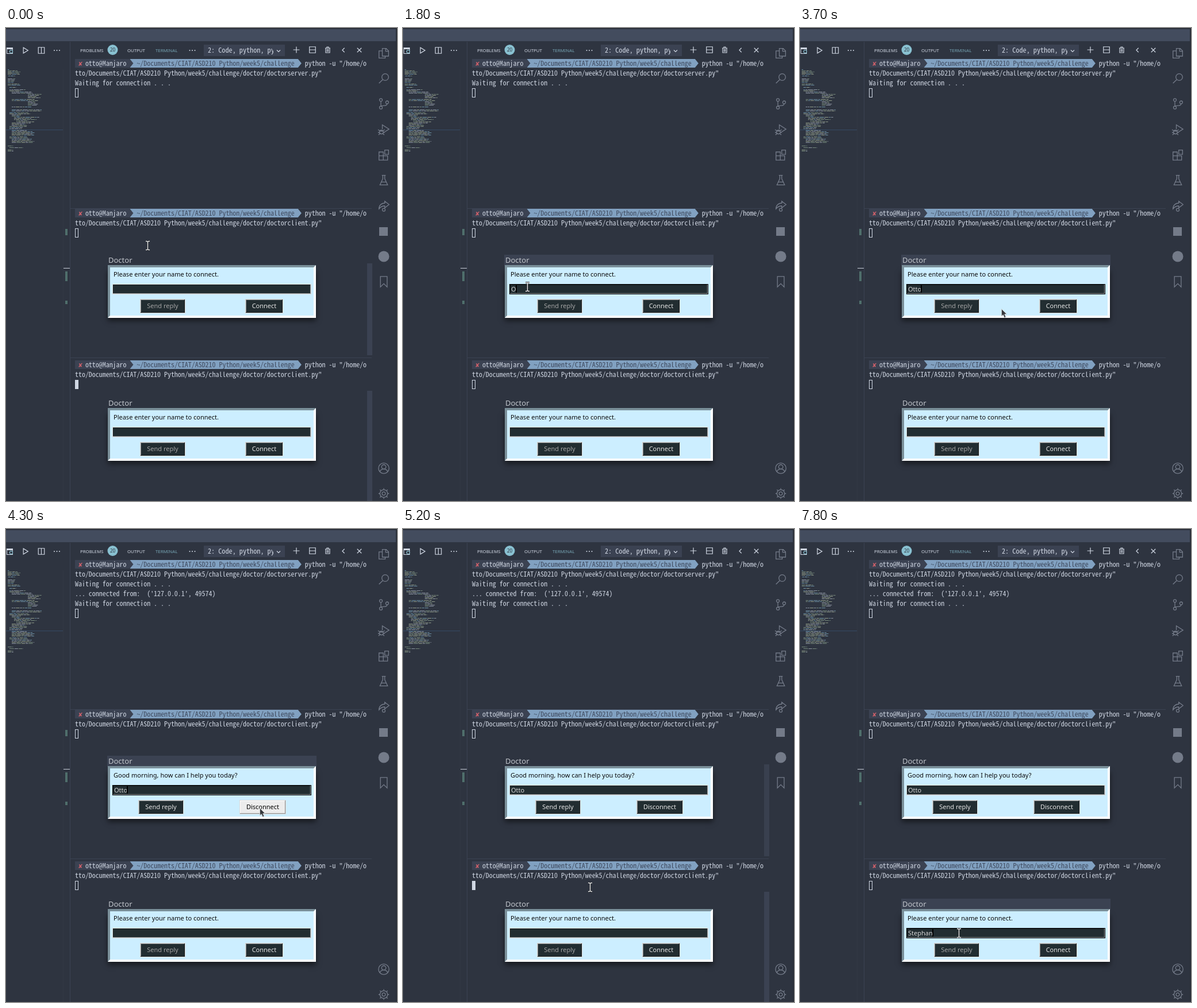
These frames come from a looping animation (680x824 px, 8000 ms). An HTML page with a canvas:

```html
<!DOCTYPE html>
<html lang="en">
<head>
<meta charset="utf-8">
<title>Doctor chat</title>
<style>
html, body { margin: 0; width: 100%; height: 100%; overflow: hidden; background: #2e3440; }
canvas { display: block; }
</style>
</head>
<body>
<canvas id="stage" width="680" height="824"></canvas>
<script>
const ctx = document.getElementById('stage').getContext('2d');
const LOOP = 8000;
const SANS = '"Noto Sans", sans-serif';
const MONO = '"Noto Sans Mono CJK JP", "Noto Sans Mono", monospace';
const BG = '#2e3440', PANEL = '#3b4252', TEXT = '#d0d7e3', BLUE = '#81a1c1', DIM = '#747b89';
const FIELD = '#222d31', LIGHT = '#909698', DARK = '#141b1d';
const CELL = 5.967, LEFT = 120;

// Monospace font whose characters advance by the given width.
function monoAt(advance) {
  ctx.font = '100px ' + MONO;
  return (advance * 100 / ctx.measureText('m').width).toFixed(2) + 'px ' + MONO;
}
const monoFont = monoAt(CELL), menuFont = monoAt(6.1);

function rect(x, y, w, h, color) {
  ctx.fillStyle = color;
  ctx.fillRect(x, y, w, h);
}

function box(x, y, w, h, color) {
  ctx.strokeStyle = color;
  ctx.lineWidth = 1;
  ctx.strokeRect(x + 0.5, y + 0.5, w - 1, h - 1);
}

function text(str, x, y, font, color, align = 'left') {
  ctx.font = font;
  ctx.fillStyle = color;
  ctx.textAlign = align;
  ctx.fillText(str, x, y);
}

const sans = (str, x, y, size, color, align) => text(str, x, y, size + 'px ' + SANS, color, align);
const mono = (str, col, y, color = TEXT) => text(str, LEFT + col * CELL, y, monoFont, color);

function poly(points, color) {
  ctx.fillStyle = color;
  ctx.beginPath();
  points.forEach(([x, y]) => ctx.lineTo(x, y));
  ctx.closePath();
  ctx.fill();
}

function disc(x, y, r, color) {
  ctx.fillStyle = color;
  ctx.beginPath();
  ctx.arc(x, y, r, 0, 7);
  ctx.fill();
}

// Line icon drawn on a 24-unit grid around (x, y).
function icon(path, x, y, size, color, weight = 1.2) {
  ctx.save();
  ctx.translate(x - size / 2, y - size / 2);
  ctx.scale(size / 24, size / 24);
  ctx.strokeStyle = color;
  ctx.lineWidth = weight * 24 / size;
  ctx.stroke(new Path2D(path));
  ctx.restore();
}

const ring = (x, y, r) => `M${x - r} ${y}a${r} ${r} 0 1 1 ${2 * r} 0a${r} ${r} 0 1 1 ${-2 * r} 0`;

const tools = [
  ['M5 3l15 9-15 9z', 34, 39, 13],
  ['M3 3H21V21H3zM12 3V21', 61.5, 39, 14],
  ['M12 2V22M2 12H22', 505, 38, 13],
  ['M3 3H21V21H3zM3 12H21', 533, 38, 14],
  ['M3 6H21M9 6V2h6V6M5 6V22H19V6M10 9V19M14 9V19', 559.5, 38, 12],
  ['M16 3L7 12l9 9', 587, 38.5, 10],
  ['M3 3L21 21M21 3L3 21', 614.5, 38.5, 10],
  ['M4 8l8 8 8-8', 474, 40, 9]
];

const activity = [
  ['M9 2h8l5 5v11H9zM16 2v6h6M9 7H2v15h13v-4', 44],
  [ring(15, 9, 7) + 'M10 14L2 22', 88],
  [ring(6, 4, 3) + ring(6, 20, 3) + ring(19, 9, 3) + 'M6 7V17M19 12c0 4-4 4-8 4-3 0-5 0-5 2', 132],
  ['M9 11V2l14 9-11 7' + ring(7, 17, 4) + 'M3 15H11M0 12l3 2M0 18h3M1 23l3-3M14 12l-3 2M14 18h-3M13 23l-3-3', 177],
  ['M2 6H11V23H2zM2 14H20V23H11V14M14 2h8v9h-8z', 221],
  ['M8 2H16M10 2V9L4 22H20L14 9V2M7 16H17', 265],
  ['M14 2l9 7-9 7v-4C8 12 5 14 2 18 2 11 7 6 14 6z' + ring(12, 20, 3), 310],
  ['M5 1H19V23l-7-7-7 7z', 442],
  [ring(12, 12, 11) + ring(12, 9, 4.5) + 'M4 19c2-7 14-7 16 0', 767],
  [ring(12, 12, 3.5) + ring(12, 12, 8) + 'M12 1v3M12 20v3M1 12h3M20 12h3M4 4l2.5 2.5M17.5 17.5L20 20M20 4l-2.5 2.5M6.5 17.5L4 20', 811]
];

// Minimap blocks: first row y, rows, left edge, longest right edge
const blocks = [
  [72, 1, 3, 7], [74, 4, 3, 28], [83, 1, 4, 20], [88, 4, 3, 18], [97, 2, 3, 30],
  [103, 1, 6, 20], [107, 2, 6, 36], [111, 2, 10, 58], [115, 4, 38, 62], [124, 2, 10, 58],
  [128, 4, 38, 56], [137, 1, 10, 62], [142, 2, 10, 70], [147, 2, 6, 44], [151, 2, 10, 26],
  [155, 3, 14, 60], [161, 2, 18, 50], [165, 3, 10, 46], [171, 3, 6, 40], [178, 5, 10, 52],
  [189, 2, 6, 44], [193, 4, 10, 56], [205, 1, 3, 14], [208, 1, 6, 30], [212, 2, 3, 13]
];

function minimap() {
  let seed = 7;
  const rnd = () => (seed = seed * 16807 % 2147483647) / 2147483647;
  const inks = ['#8b93a0', '#6c8fa3', '#74877a', '#8f9a88'];
  rect(0, 177, 99, 1, '#354a64');
  for (const [top, rows, x0, x1] of blocks) {
    for (let i = 0; i < rows; i++) {
      const end = x0 + (x1 - x0) * (0.6 + 0.4 * rnd());
      for (let x = x0; x < end;) {
        const w = Math.min(2 + rnd() * 7, end - x);
        rect(x, top + i * 2, w, 1, inks[Math.floor(rnd() * 4)]);
        x += w + 1;
      }
    }
  }
}

function chrome() {
  rect(0, 0, 680, 824, BG);
  rect(0, 0, 680, 2, '#292e39');
  rect(0, 2, 678, 21, '#434c5e');
  rect(678, 0, 2, 824, '#272c36');
  minimap();
  rect(99, 72, 1, 752, '#323845');
  rect(111, 24, 1, 800, PANEL);
  rect(112, 314, 524, 1, PANEL);
  rect(112, 574, 524, 1, PANEL);
  rect(103, 350, 4, 11, '#4f6e6b');
  rect(103, 424, 4, 17, '#4f6e6b');
  rect(103, 475, 4, 6, '#4f6e6b');
  rect(100, 418, 11, 1, '#c8ced9');

  sans('PROBLEMS', 129, 41.5, 7.8, TEXT);
  sans('OUTPUT', 211, 41.5, 7.8, TEXT);
  sans('TERMINAL', 260, 41.5, 7.8, '#77a6b5');
  disc(185.5, 38, 9, '#88c0d0');
  sans('20', 185.5, 41, 8, BG, 'center');
  for (const x of [84, 88.5, 93, 319.5, 324, 328.5]) disc(x, 39, 1, TEXT);
  rect(344, 29, 141, 20, PANEL);
  ctx.save();
  ctx.beginPath();
  ctx.rect(344, 29, 121, 20);
  ctx.clip();
  text('2: Code, python, py', 351, 43, menuFont, TEXT);
  ctx.restore();
  for (const [path, x, y, size] of tools) icon(path, x, y, size, TEXT);
  box(1, 34, 11, 11, TEXT);
  rect(1, 34, 11, 3, TEXT);
  disc(9, 41, 3, BG);
  icon(ring(12, 12, 9), 9, 41, 7, '#88c0d0');

  for (const [path, y] of activity) icon(path, 657, y, 20, DIM, 1.3);
  rect(649, 347, 15, 15, DIM);
  disc(657, 398, 9.5, DIM);
}

function prompt(top, script) {
  const arrow1 = LEFT + 16 * CELL, arrow2 = LEFT + 65 * CELL;
  const mid = top + 7.5, low = top + 15, base = top + 11.5;
  poly([[arrow1, top], [arrow2, top], [arrow2 + 6, mid], [arrow2, low], [arrow1, low]], BLUE);
  poly([[LEFT, top], [arrow1, top], [arrow1 + 6, mid], [arrow1, low], [LEFT, low]], PANEL);
  text('✘', LEFT + 1.5 * CELL + 0.5, base, '10px "DejaVu Sans", sans-serif', '#d0606a', 'center');
  mono('otto@Manjaro', 3, base);
  mono('~/Documents/CIAT/ASD210 Python/week5/challenge', 18, base, '#3f4a5e');
  mono('python -u "/home/o', 67, base);
  mono(`tto/Documents/CIAT/ASD210 Python/week5/challenge/doctor/${script}.py"`, 0, base + 17);
}

function block(y, solid) {
  if (solid) rect(120, y, 6, 16, TEXT);
  else box(120, y, 6, 16, TEXT);
}

// Outer ring with a one-pixel bevel inside.
function field(x, y, w, h, edge, fill, topLeft, lowRight) {
  rect(x, y, w, h, edge);
  rect(x + 1, y + 1, w - 2, h - 2, lowRight);
  rect(x + 1, y + 1, w - 3, h - 3, topLeft);
  rect(x + 2, y + 2, w - 4, h - 4, fill);
}

function button(x, y, w, label, { off, hover } = {}) {
  if (hover) field(x, y, w, 25, '#d9d9d9', '#ececec', '#fff', '#8e8e8e');
  else field(x, y, w, 25, '#d9d9d9', FIELD, LIGHT, DARK);
  sans(label, x + w / 2, y + 16, 11, hover ? '#000' : off ? '#a3a3a3' : '#e4e4e4', 'center');
}

function dialog(top, s) {
  if (s.active) rect(176, top - 19, 364, 19, PANEL);
  sans('Doctor', 178, top - 5.5, 13, '#c3c7cd');
  const x0 = 177, x1 = 539, y0 = top - 1, y1 = top + 91;
  ctx.save();
  ctx.shadowColor = 'rgba(0,0,0,.55)';
  ctx.shadowBlur = 9;
  ctx.shadowOffsetY = 5;
  rect(x0, y0 + 6, x1 - x0, y1 - y0 - 6, '#fff');
  ctx.restore();
  rect(x0, y0, x1 - x0, y1 - y0, '#fff');
  poly([[x0, y0], [x1, y0], [x1 - 4, y0 + 4], [x0 + 4, y0 + 4], [x0 + 4, y1 - 4], [x0, y1]], '#7a8f99');
  rect(x0 + 4, y0 + 4, x1 - x0 - 8, y1 - y0 - 8, '#cceeff');

  const line = s.online ? 'Good morning, how can I help you today?' : 'Please enter your name to connect.';
  sans(line, 187, top + 19, 11, '#0a0a0a');

  field(185, top + 32, 346, 18, s.focus ? '#000' : '#d9d9d9', FIELD, DARK, LIGHT);
  sans(s.name, 188, top + 44.5, 11, '#d8d8d8');
  if (s.focus && s.caret) {
    ctx.font = '11px ' + SANS;
    rect(187 + Math.round(ctx.measureText(s.name).width), top + 34, 2, 13, '#000');
  }

  const y = top + 58;
  if (s.online) {
    button(230, y, 79, 'Send reply');
    button(406, y, 81, 'Disconnect', { hover: s.hover });
  } else {
    button(233, y, 79, 'Send reply', { off: true });
    button(416, y, 66, 'Connect', { hover: s.hover });
  }
}

// Pointer stops: time, x, y
const stops = [
  [200, 246, 379], [400, 222, 449], [700, 216, 451], [3400, 216, 451], [3700, 350, 489],
  [4000, 441, 486], [4800, 441, 486], [5000, 374, 544], [5400, 276, 704]
];

function pointerAt(t) {
  let i = stops.findIndex(s => s[0] > t);
  if (i === 0) return stops[0].slice(1);
  if (i < 0) return stops[stops.length - 1].slice(1);
  const [t0, x0, y0] = stops[i - 1], [t1, x1, y1] = stops[i];
  const k = (t - t0) / (t1 - t0);
  return [Math.round(x0 + (x1 - x0) * k), Math.round(y0 + (y1 - y0) * k)];
}

const inside = ([px, py], x, y, w, h) => px >= x && px < x + w && py >= y && py < y + h;

function pointer(p) {
  const [x, y] = p;
  const tops = [414, 663];
  const arrow = tops.some(top => inside(p, 176, top - 19, 364, 110) && !inside(p, 185, top + 32, 346, 18));
  ctx.save();
  ctx.translate(x, y);
  if (arrow) {
    const shape = new Path2D('M0.5 0.5V13L3.3 10.6 5.5 15.5 8 14.4 5.8 9.7 9.5 9.4z');
    ctx.fillStyle = '#35393d';
    ctx.strokeStyle = '#c9cdd0';
    ctx.lineWidth = 1;
    ctx.fill(shape);
    ctx.stroke(shape);
  } else {
    const shape = new Path2D('M-3 -7.5H-1L0.5 -6.5 2 -7.5H4M0.5 -6.5V6.5M-3 7.5H-1L0.5 6.5 2 7.5H4');
    ctx.strokeStyle = '#15191e';
    ctx.lineWidth = 3;
    ctx.stroke(shape);
    ctx.strokeStyle = '#f4f4f4';
    ctx.lineWidth = 1.4;
    ctx.stroke(shape);
  }
  ctx.restore();
}

const typed = (word, times, t) => word.slice(0, times.filter(k => k <= t).length);
const blink = (t, start) => (t - start + 900) % 900 < 600;
const fade = (t, from, to) => Math.max(0, Math.min(1, (to - t) / (to - from)));

function slider(y, h, alpha) {
  ctx.globalAlpha = alpha;
  rect(628, y, 9, h, PANEL);
  ctx.globalAlpha = 1;
}

function draw(now) {
  const t = Math.floor(now % LOOP / 100) * 100;
  const p = pointerAt(t);
  const online = t >= 4200;
  chrome();

  prompt(54, 'doctorserver');
  mono('Waiting for connection . . .', 0, 99.5);
  if (online) {
    mono("... connected from:  ('127.0.0.1', 49574)", 0, 116.5);
    mono('Waiting for connection . . .', 0, 133.5);
  }
  block(online ? 139 : 105, false);
  prompt(315, 'doctorclient');
  block(349, false);
  prompt(579, 'doctorclient');
  block(613, t < 400 || t === 5100 || t === 5200);

  slider(410, 160, t < 4900 ? fade(t, 300, 1000) : fade(t, 5100, 5700));
  slider(632, 192, t < 5100 ? fade(t, 300, 1000) : fade(t, 5300, 6000));

  const first = t >= 300 && t < 4900;
  dialog(414, {
    active: first,
    focus: first && t >= 400,
    caret: blink(t, t < 3100 ? 400 : t < 3200 ? 600 : 500),
    name: typed('Otto', [1800, 2100, 2200, 2300], t),
    online,
    hover: inside(p, online ? 406 : 416, 472, online ? 81 : 66, 25)
  });
  dialog(663, {
    active: t >= 5300,
    focus: t >= 5900,
    caret: blink(t, 5900),
    name: typed('Stephan', [7000, 7200, 7300, 7400, 7500, 7600, 7800], t)
  });
  pointer(p);
}

function tick() {
  draw(performance.now());
  requestAnimationFrame(tick);
}
tick();
</script>
</body>
</html>
```
